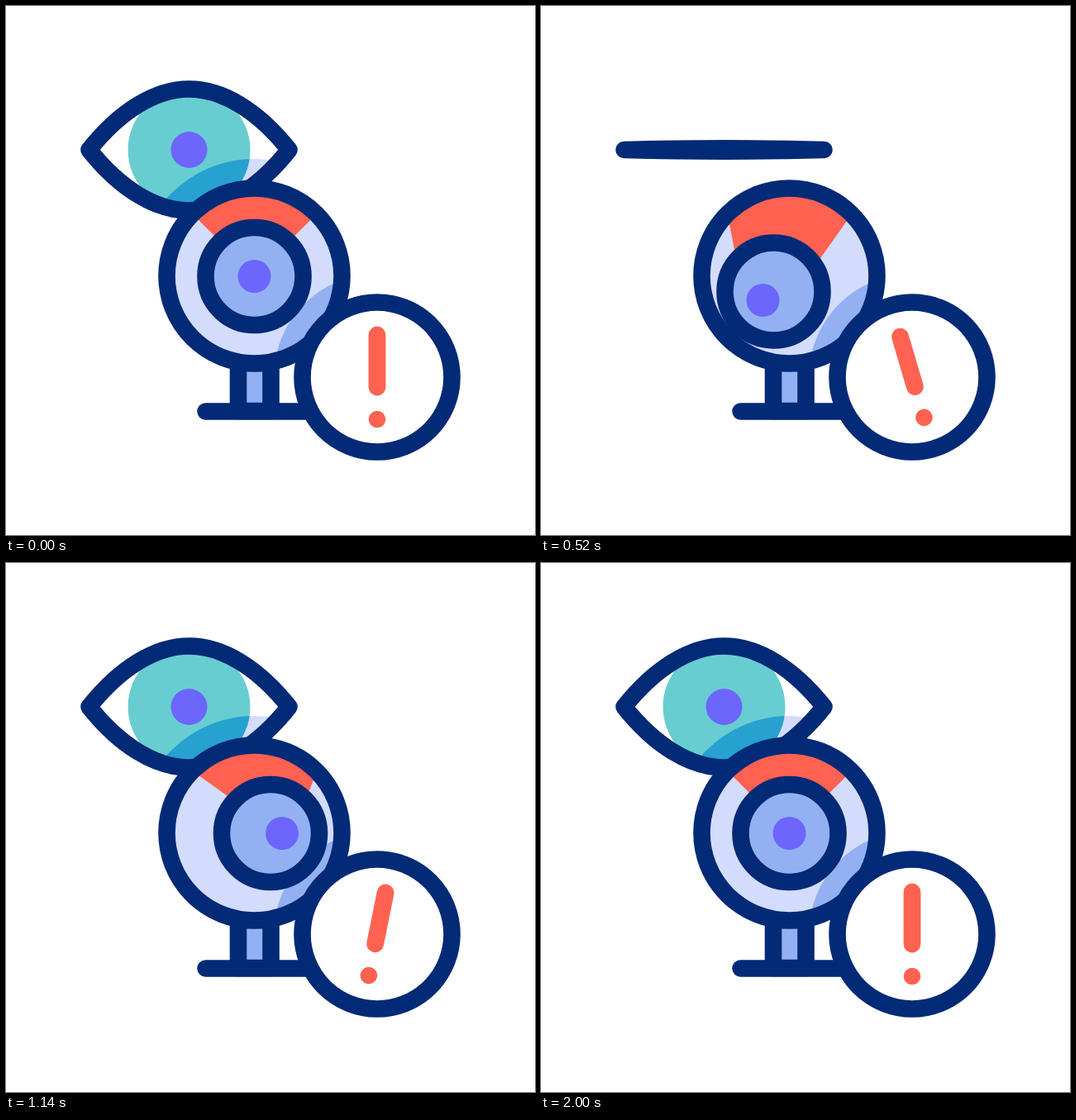
Animation of 640x640 px, one loop 2.42 s. Source, as an HTML page:

```html
<!DOCTYPE html>
<html lang="en">
<head>
<meta charset="utf-8">
<title>Watching camera</title>
<style>
  html, body { margin: 0; width: 100%; height: 100%; overflow: hidden; background: #fff; }
  svg { display: block; width: 100vw; height: 100vh; }
  .line { stroke: #022a76; stroke-width: 20.6; stroke-linecap: round; stroke-linejoin: round; }
  .light { fill: #d3dcfc; }
  .mid { fill: #93b1f2; }
  .violet { fill: #6c66fc; }
  .red { fill: #ff6250; }
</style>
</head>
<body>
<svg viewBox="0 0 640 640">
  <defs>
    <clipPath id="eyeClip"><path class="lid"/></clipPath>
    <clipPath id="irisClip"><circle cx="221.5" cy="174" r="74"/></clipPath>
    <clipPath id="bodyClip"><circle cx="300.5" cy="326.5" r="106"/></clipPath>
  </defs>

  <g clip-path="url(#eyeClip)">
    <circle class="light" cx="300.5" cy="327" r="142"/>
    <circle cx="221.5" cy="174" r="74" fill="#68cdd0"/>
    <circle cx="300.5" cy="327" r="142" fill="#27a1cf" clip-path="url(#irisClip)"/>
    <circle class="violet" cx="221.5" cy="174" r="22"/>
  </g>
  <path class="lid line" fill="none"/>

  <path class="mid line" d="M281 430V490H320.5V430"/>
  <path class="line" d="M241.5 490.5H362"/>

  <g clip-path="url(#bodyClip)">
    <circle class="light" cx="300.5" cy="326.5" r="106"/>
    <circle class="mid" cx="449" cy="449" r="125"/>
    <polygon id="wedge" class="red"/>
  </g>
  <circle class="line" cx="300.5" cy="326.5" r="106" fill="none"/>
  <circle id="lens" class="mid line" cx="300.5" cy="327" r="59"/>
  <circle id="pupil" class="violet" cx="300.5" cy="327" r="20"/>

  <circle class="line" cx="449" cy="449" r="90.5" fill="#fff"/>
  <g id="mark">
    <path d="M449 398V461" stroke="#ff6250" stroke-width="20.8" stroke-linecap="round"/>
    <circle class="red" cx="449" cy="500" r="10.3"/>
  </g>
</svg>
<script>
const LOOP = 2420;
const $ = id => document.getElementById(id);
const lids = document.querySelectorAll('.lid');

// Keys are [time, value]; every span eases in and out.
const EYE = [[0, 1], [200, 0.022], [700, 0.022], [900, 1]];
const LEFT = [[0, 0], [400, 1], [700, 1], [1100, 0]];
const RIGHT = [[700, 0], [1100, 1], [1400, 1], [1760, 0]];
const SWING = [[0, 0], [200, 15], [600, -20], [1000, 20], [1400, -10], [1800, 5], [2000, 0]];

function at(keys, t) {
  if (t <= keys[0][0]) return keys[0][1];
  for (let i = 1; i < keys.length; i++) {
    const [t0, a] = keys[i - 1], [t1, b] = keys[i];
    if (t < t1) {
      const p = (t - t0) / (t1 - t0);
      return a + (b - a) * p * p * (3 - 2 * p);
    }
  }
  return keys[keys.length - 1][1];
}

function lidPath(open) {
  const y = d => 174 + d * open;
  const half = s => `C${s < 0 ? 137 : 306} ${y(46 * s)} ${s < 0 ? 180 : 263} ${y(73.5 * s)} 221.5 ${y(73.5 * s)}`;
  return `M100.5 174${half(-1)}S306 ${y(-46)} 342.5 174${half(1)}S137 ${y(46)} 100.5 174Z`;
}

function draw(t) {
  const l = at(LEFT, t), r = at(RIGHT, t);
  const move = (left, right) => [left[0] * l + right[0] * r, left[1] * l + right[1] * r];
  const shift = (id, left, right) => $(id).setAttribute('transform', `translate(${move(left, right)})`);

  const d = lidPath(at(EYE, t));
  lids.forEach(lid => lid.setAttribute('d', d));

  shift('lens', [-19, 18.5], [19.5, 0]);
  shift('pupil', [-32, 29], [33.5, 0]);

  const a = move([-27.5, 26], [23, 5]), b = move([-6, 26], [24, 5]);
  $('wedge').setAttribute('points',
    `225.5,200 376,200 376,251.5 ${335 + b[0]},${292 + b[1]} ${266 + a[0]},${292 + a[1]} 225.5,251.5`);

  $('mark').setAttribute('transform', `rotate(${at(SWING, t)} 449 449)`);
}

const start = performance.now();
function tick() {
  draw((performance.now() - start) % LOOP);
  requestAnimationFrame(tick);
}
tick();
</script>
</body>
</html>
```
